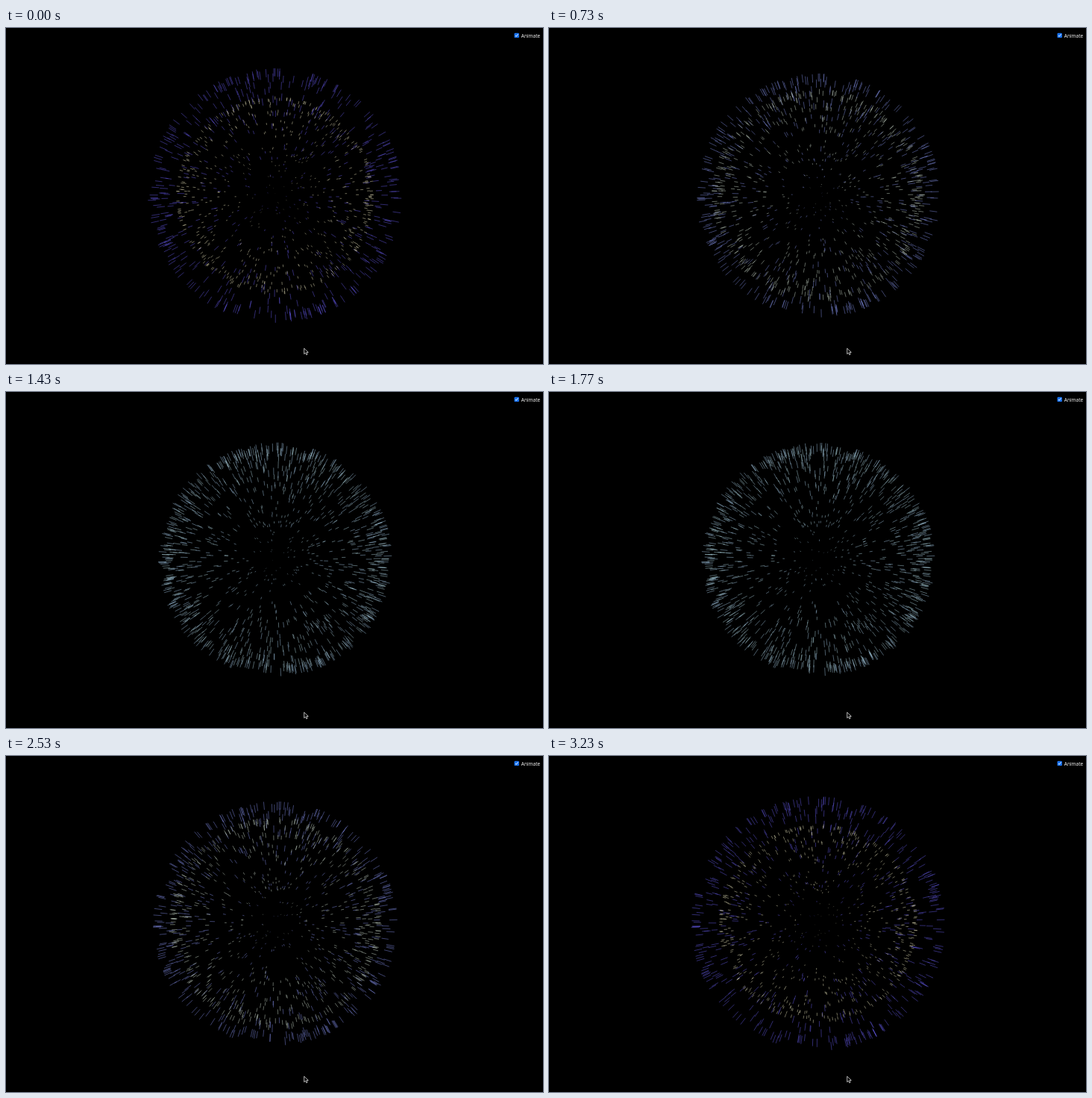
An HTML page with a canvas for the animation above (3260 ms loop, 720 by 450 pixels).

```html
<!DOCTYPE html>
<html lang="en">
<head>
<meta charset="utf-8">
<title>Line sphere</title>
<style>
  html, body { margin: 0; width: 100%; height: 100%; overflow: hidden; background: #000; }
  canvas, svg { position: absolute; left: 0; top: 0; width: 720px; height: 450px; }
  text { font: 500 6.5px "Open Sans", "Noto Sans", sans-serif; fill: #fff; }
</style>
</head>
<body>
<canvas width="720" height="450"></canvas>
<svg viewBox="0 0 720 450">
  <rect x="681.5" y="6.7" width="6.4" height="6.4" rx="1.2" fill="#1a73f0"/>
  <path d="M683 10l1.2 1.3 2.3-3" fill="none" stroke="#fff" stroke-width=".9"/>
  <text x="690.8" y="12.9">Animate</text>
  <path d="M399.7 429v7.6l1.8-1.6 1.2 2.7 1.4-.6-1.2-2.7h2.4z" fill="#000" stroke="#fff" stroke-width=".7"/>
</svg>
<script>
const LOOP = 3260, TURN = 1620, COUNT = 620;
const CX = 361, CY = 224.5, CAMERA = 700, SPIN = 0.1;
const ctx = document.querySelector('canvas').getContext('2d');

let seed = 7;
function random() {
  seed = (seed * 1664525 + 1013904223) % 4294967296;
  return seed / 4294967296;
}

function randomDirection() {
  const y = random() * 2 - 1, r = Math.sqrt(1 - y * y);
  return { y, r, angle: random() * Math.PI * 2 };
}

// Each shell travels between two tip radii, lengths and colours.
const makeShell = (tip, length, color) =>
  ({ tip, length, color, rays: Array.from({ length: COUNT }, randomDirection) });
const shells = [
  makeShell([166, 151.5], [10, 10], [[96, 84, 220], [155, 195, 210]]),
  makeShell([130.5, 151.5], [4, 10], [[222, 216, 178], [155, 195, 210]])
];

const mix = ([a, b], p) => a + (b - a) * p;

function project(x, y, z, radius) {
  const scale = radius * CAMERA / (CAMERA - z * radius);
  return [CX + x * scale, CY + y * scale];
}

function drawShell({ tip, length, color, rays }, p, turn) {
  const outer = mix(tip, p), inner = outer - mix(length, p);
  const rgb = color[0].map((c, i) => mix([c, color[1][i]], p));
  ctx.strokeStyle = `rgb(${rgb})`;
  ctx.beginPath();
  for (const { y, r, angle } of rays) {
    const x = r * Math.sin(angle + turn), z = r * Math.cos(angle + turn);
    ctx.moveTo(...project(x, y, z, inner));
    ctx.lineTo(...project(x, y, z, outer));
  }
  ctx.stroke();
}

function draw(now) {
  const t = now % LOOP;
  const p = t < TURN ? t / TURN : (LOOP - t) / (LOOP - TURN);
  ctx.clearRect(0, 0, 720, 450);
  ctx.lineWidth = 0.5;
  for (const shell of shells) drawShell(shell, p, SPIN * t / 1000);
  requestAnimationFrame(draw);
}
requestAnimationFrame(draw);
</script>
</body>
</html>
```
